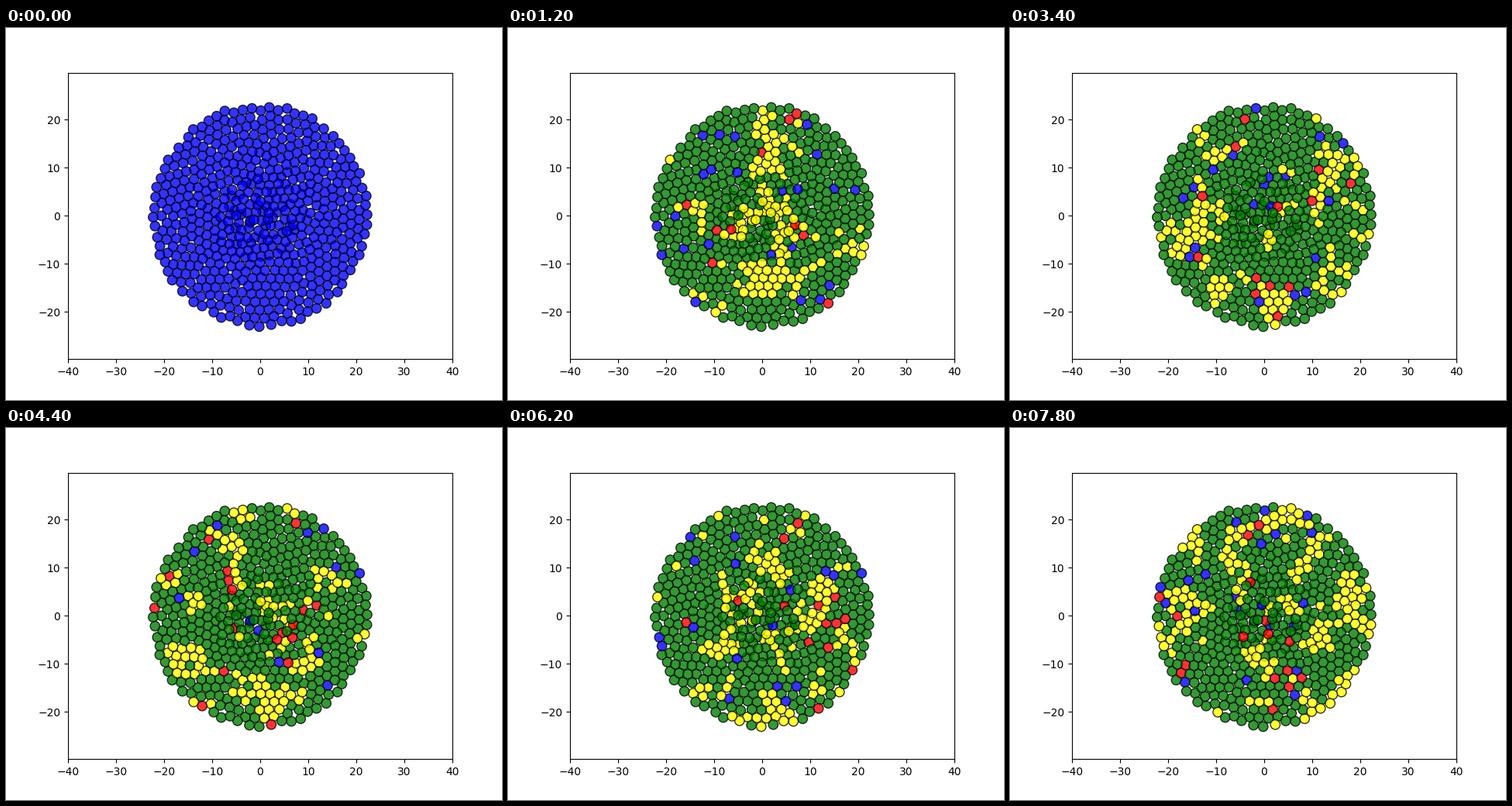
These frames come from a looping animation (640x480 px, 8000 ms). A matplotlib script:

```python
import numpy as np
import matplotlib.pyplot as plt
from matplotlib.animation import FuncAnimation
from matplotlib.collections import PatchCollection
from matplotlib.colors import to_rgba
from matplotlib.patches import Circle

FRAMES, STEP_MS = 40, 200
REST, SPARK, FIRE, TIRED = range(4)
COLORS = np.array([to_rgba(c, 0.8) for c in ("green", "blue", "red", "yellow")])

WALL = np.array([22.5, 23.1])   # half axes of the cell disc
REACH = 2.5                     # distance at which cells excite each other
SPARK_RATE = 0.04
SPARK_SPREAD, FIRE_SPREAD = 0.05, 0.21
TIRED_STEPS = 8
rng = np.random.default_rng(11)


def spacing(r):
    t = np.clip(r / 15, 0, 1)
    return 1.55 + 0.33 * t * t * (3 - 2 * t)


def offsets(pos):
    diff = pos[:, None] - pos[None]
    return diff, np.sqrt((diff ** 2).sum(-1)) + 1e-9


def pack_cells():
    """Start from a spiral, dense in the middle, and push the cells apart."""
    r = np.linspace(0, WALL[0], 400)
    count = np.cumsum(2 * np.pi * r / (0.866 * spacing(r) ** 2)) * (r[1] - r[0])
    n = np.arange(1, int(count[-1]))
    radius = np.interp(n, count, r)
    angle = n * np.pi * (3 - np.sqrt(5))
    pos = np.stack([radius * np.cos(angle), radius * np.sin(angle)], 1)
    pos += rng.normal(0, 0.3, pos.shape)
    wall = WALL * rng.uniform(0.965, 1, (len(pos), 1))
    for _ in range(130):
        diff, dist = offsets(pos)
        size = spacing(np.hypot(*pos.T))
        want = 1.1 * (size[:, None] + size[None]) / 2
        push = np.clip(want - dist, 0, None) / dist
        np.fill_diagonal(push, 0)
        pos += 0.12 * np.einsum("ij,ijk->ik", push, diff)
        pos /= np.maximum(1, np.hypot(*(pos / wall).T))[:, None]
    loose = 0.35 * np.exp(-(np.hypot(*pos.T) / 9) ** 2)
    pos += loose[:, None] * rng.normal(size=pos.shape)
    return pos[rng.permutation(len(pos))]


def simulate(pos):
    """Resting cells spark at random or catch fire from their neighbours."""
    total = len(pos)
    _, dist = offsets(pos)
    near = ((dist < REACH) & (dist > 0.01)).astype(int)
    state = np.where(rng.random(total) < SPARK_RATE, FIRE, REST)
    tired = np.zeros(total, int)
    history = [np.full(total, SPARK)]
    for _ in range(1, FRAMES):
        history.append(state)
        fires, sparks = near @ (state == FIRE), near @ (state == SPARK)
        calm = (1 - FIRE_SPREAD) ** fires * (1 - SPARK_SPREAD) ** sparks
        lit = rng.random(total) > calm
        spark = rng.random(total) < SPARK_RATE
        tired = np.where(state == FIRE, TIRED_STEPS, np.maximum(tired - 1, 0))
        state = np.select([tired > 0, lit, spark], [TIRED, FIRE, SPARK], REST)
    return history


cells = pack_cells()
states = simulate(cells)

fig, ax = plt.subplots(figsize=(6.4, 4.8), dpi=100)
half_height = 40 * 369.6 / 496
ax.set(xlim=(-40, 40), ylim=(-half_height, half_height))
discs = PatchCollection([Circle(p, 1) for p in cells],
                        edgecolors=(0, 0, 0, 0.8), linewidths=1)
ax.add_collection(discs)


def draw(i):
    discs.set_facecolor(COLORS[states[i]])
    return (discs,)


anim = FuncAnimation(fig, draw, frames=FRAMES, interval=STEP_MS,
                     repeat=True, repeat_delay=0, blit=False)
plt.show()
```
